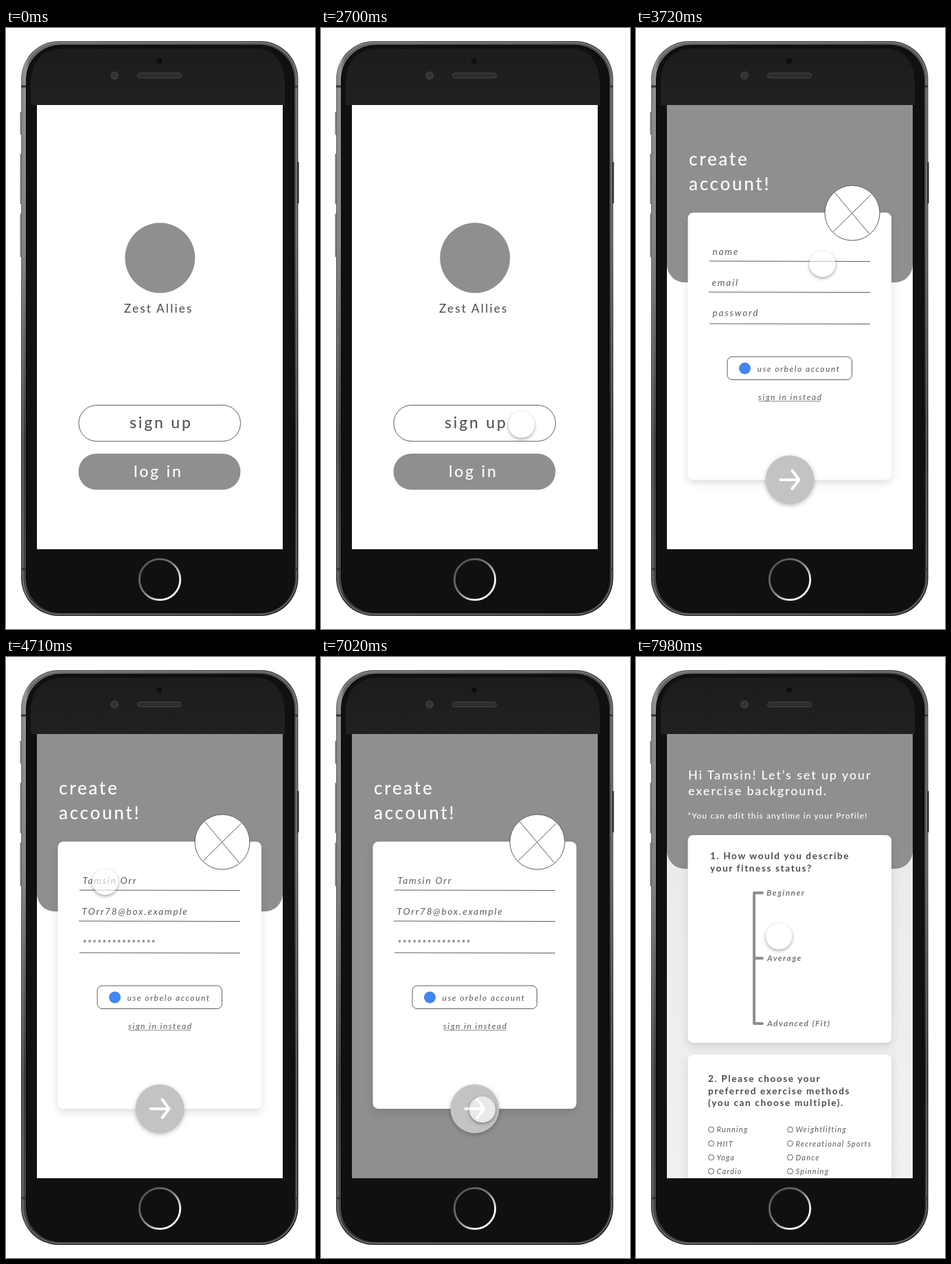
Animation, 450 px wide and 874 px high, one loop 8000 ms. Source, as an HTML page:

```html
<!DOCTYPE html>
<html lang="en">
<head>
<meta charset="utf-8">
<title>Sign-up flow</title>
<style>
html, body { margin: 0; width: 100%; height: 100%; overflow: hidden; background: #fff; }
svg { position: absolute; left: 0; top: 0; }
text { font-family: Lato, "Open Sans", sans-serif; font-weight: 500; fill: #555; white-space: pre; }
.brand { font-size: 17px; letter-spacing: 2.2px; }
.button { font-size: 23px; letter-spacing: 2.8px; }
.title { font-size: 26px; letter-spacing: 2.7px; fill: #fff; }
.field { font-size: 13.5px; letter-spacing: 1.8px; font-style: italic; fill: #6a6a6a; }
.stars { font-weight: 700; }
.small { font-size: 12px; letter-spacing: 1.5px; font-style: italic; fill: #666; }
.intro { font-size: 18px; letter-spacing: 1.85px; fill: #fff; }
.note { font-size: 12px; letter-spacing: 1.05px; fill: #fff; }
.question { font-size: 13.5px; letter-spacing: 1.65px; font-weight: 700; fill: #4a4a4a; }
.level { font-size: 12px; letter-spacing: 1.4px; font-weight: 700; font-style: italic; fill: #777; }
.option { font-size: 11px; letter-spacing: 1.15px; font-style: italic; fill: #666; }
.line { fill: none; stroke: #5c5c5c; stroke-width: 1; }
.card { fill: #fff; filter: drop-shadow(0 5px 6px rgba(0,0,0,.12)); }
#screen { position: absolute; left: 45px; top: 112px; width: 358px; height: 646px; overflow: hidden; }
#cursor {
  position: absolute; left: -64px; top: -131px; width: 38px; height: 38px; border-radius: 50%;
  background: rgba(255,255,255,.64); box-shadow: 0 2px 5px rgba(0,0,0,.36);
}
</style>
</head>
<body>
<svg width="450" height="874" viewBox="0 0 450 874">
  <defs>
    <linearGradient id="rim"><stop stop-color="#777"/><stop offset=".015" stop-color="#999"/><stop offset=".03" stop-color="#666"/><stop offset=".97" stop-color="#4a4a4a"/><stop offset="1" stop-color="#555"/></linearGradient>
    <linearGradient id="shade" x2="0" y2="1"><stop stop-opacity="0"/><stop offset=".35" stop-opacity=".1"/><stop offset=".7" stop-opacity=".6"/><stop offset="1" stop-opacity=".5"/></linearGradient>
    <linearGradient id="top" x2="0" y2="1"><stop stop-color="#1c1c1c"/><stop offset="1" stop-color="#212121"/></linearGradient>
    <linearGradient id="ring" x2="1" y2="1"><stop stop-color="#484848"/><stop offset=".45" stop-color="#777"/><stop offset=".78" stop-color="#fff"/></linearGradient>
    <linearGradient id="paper" x2="0" y2="1"><stop offset=".3" stop-color="#ebebeb"/><stop offset="1" stop-color="#f0f0f0"/></linearGradient>
    <clipPath id="glass"><rect x="45" y="112" width="358" height="646"/></clipPath>
  </defs>

  <g id="phone">
    <path d="M21.500 122v33M21.500 183v73M21.500 270v63" stroke="#777" stroke-width="2"/>
    <rect x="22" y="19" width="403.500" height="836" rx="55" fill="url(#rim)"/>
    <rect x="22" y="19" width="403.500" height="836" rx="55" fill="url(#shade)"/>
    <rect x="24.500" y="21.500" width="398.500" height="831" rx="53" fill="none" stroke="#999" stroke-opacity=".65" stroke-width="1.500"/>
    <path d="M425.500 195v60" stroke="#222" stroke-width="2"/>
    <path d="M22 85h7M419 85h6M22 787h7M419 787h6" stroke="#333" stroke-width="3"/>
    <rect x="29.500" y="25" width="390" height="825" rx="50" fill="#101010" stroke="#050505"/>
    <path d="M36 112V78Q38 32 82 30H368Q404 34 406 80V112Z" fill="url(#top)"/>
    <circle cx="223" cy="48" r="4" fill="#0d0d0d"/>
    <circle cx="158" cy="69" r="5" fill="#333" stroke="#4c4c4c" stroke-width="2" stroke-dasharray="1 1"/>
    <rect x="191.500" y="65.500" width="64" height="7" rx="3.500" fill="#2c2c2c" stroke="#454545"/>
    <circle cx="224" cy="802" r="29.700" fill="#101010" stroke="url(#ring)" stroke-width="2.800"/>
  </g>

  <g clip-path="url(#glass)">
    <rect x="45" y="112" width="358" height="646" fill="#fff"/>
    <circle cx="224.300" cy="334.300" r="51" fill="#8f8f8f"/>
    <text class="brand" x="172" y="414">Zest Allies</text>
    <rect class="line" x="106" y="548.500" width="235.500" height="52.500" rx="26"/>
    <text class="button" x="180" y="582">sign up</text>
    <rect x="105.500" y="619" width="236" height="52.500" rx="26" fill="#8f8f8f"/>
    <text class="button" x="186" y="653" style="fill:#fff">log in</text>

    <g id="page">
      <rect x="45" y="112" width="358" height="646" fill="#fff"/>
      <rect id="tint" x="45" y="112" width="358" height="646" fill="url(#paper)"/>
      <rect id="header" x="45" y="60" width="358" height="310" rx="26" fill="#8f8f8f"/>

      <g id="survey">
        <text class="intro" x="76" y="178">Hi Tamsin! Let’s set up your</text>
        <text class="intro" x="76" y="201">exercise background.</text>
        <text class="note" x="75" y="235">*You can edit this anytime in your Profile!</text>
        <rect class="card" x="75.500" y="259" width="296.500" height="302" rx="8"/>
        <text class="question" x="108" y="294">1. How would you describe</text>
        <text class="question" x="108" y="312">your fitness status?</text>
        <path d="M184 343H172V533H184M172 438H184" fill="none" stroke="#8f8f8f" stroke-width="4" stroke-linecap="round" stroke-linejoin="round"/>
        <text class="level" x="190" y="347">Beginner</text>
        <text class="level" x="191" y="442">Average</text>
        <text class="level" x="191" y="537">Advanced (Fit)</text>
        <rect class="card" x="75.500" y="578" width="296.500" height="240" rx="8"/>
        <text class="question" x="105" y="618">2. Please choose your</text>
        <text class="question" x="105" y="636">preferred exercise methods</text>
        <text class="question" x="105" y="653">(you can choose multiple).</text>
        <g id="options"></g>
      </g>

      <g id="form">
        <text class="title" x="77" y="200">create</text>
        <text class="title" x="77" y="236">account!</text>
        <rect class="card" x="75.500" y="268.500" width="296.500" height="388.500" rx="8"/>
        <path class="line" d="M107 339L341 339.500M106 384L341 384.500M107 430L341 430.500"/>
        <circle class="line" cx="315" cy="269" r="40" style="fill:#fff"/>
        <path class="line" d="M289.500 239.500L339.500 299M342.500 242L287 296.500"/>
        <g id="blank">
          <text class="field" x="111.500" y="330">name</text>
          <text class="field" x="110.500" y="375">email</text>
          <text class="field" x="111.500" y="419">password</text>
        </g>
        <g id="filled">
          <text class="field" x="111.500" y="330">Tamsin Orr</text>
          <text class="field" x="110.500" y="375">TOrr78@box.example</text>
          <text class="field stars" x="111.500" y="421">***************</text>
        </g>
        <rect class="line" x="133" y="478" width="181.500" height="33.500" rx="7"/>
        <circle cx="158.500" cy="495" r="8.500" fill="#4285f4"/>
        <text class="small" x="176.500" y="500">use orbelo account</text>
        <text class="small" x="178" y="541">sign in instead</text>
        <path d="M178.500 542.800H269" stroke="#888"/>
        <circle cx="224" cy="657" r="35.500" fill="#c3c3c3" style="filter:drop-shadow(0 2px 3px rgba(0,0,0,.25))"/>
        <path d="M210.500 657H237M227.500 643.500L237.500 657L227.500 670" fill="none" stroke="#fff" stroke-width="4" stroke-linecap="round" stroke-linejoin="round"/>
      </g>
    </g>
  </g>
</svg>
<div id="screen"><div id="cursor"></div></div>

<script>
const LOOP = 8000;
const $ = id => document.getElementById(id);

// Each move: start ms, end ms, then start, control and end points of a curve.
const moves = [
  [1200, 2130, 426, 597, 360, 583, 292, 577],
  [3100, 4110, 292, 577, 394, 301, 144.5, 327],
  [4750, 6200, 144.5, 327, 311, 546, 235, 658],
  [7250, 8000, 235, 658, 358, 482, 207.5, 406]
];

const columns = [
  [109.5, ["Running", "HIIT", "Yoga", "Cardio"]],
  [224.5, ["Weightlifting", "Recreational Sports", "Dance", "Spinning"]]
];
$("options").innerHTML = columns.map(([x, names]) => names.map((name, i) => {
  const y = 687.3 + i * 20.2;
  return `<circle class="line" cx="${x}" cy="${y}" r="4"/>
    <text class="option" x="${x + 8}" y="${y + 4}">${name}</text>`;
}).join("")).join("");

const progress = (t, a, b) => Math.min(1, Math.max(0, (t - a) / (b - a)));
const smooth = p => p * p * (3 - 2 * p);
const easeOut = p => 1 - (1 - p) ** 3;
const bezier = (u, a, b, c) => (1 - u) ** 2 * a + 2 * u * (1 - u) * b + u * u * c;
const fade = (id, value) => { $(id).style.opacity = value; };

function cursorAt(t) {
  const move = moves.filter(m => m[0] <= t).pop() || moves[0];
  const [from, to, x0, y0, cx, cy, x1, y1] = move;
  const u = smooth(progress(t, from, to));
  return [bezier(u, x0, cx, x1), bezier(u, y0, cy, y1)];
}

function draw(t) {
  const [x, y] = cursorAt(t);
  $("cursor").style.transform = `translate(${x}px, ${y}px)`;

  const typed = smooth(progress(t, 4380, 4690));
  const grow = easeOut(progress(t, 6550, 6950));
  const next = progress(t, 7040, 7440);
  const bottom = 370 + 418 * grow - 480 * easeOut(next);

  fade("page", smooth(progress(t, 2750, 3030)));
  fade("blank", 1 - typed);
  fade("filled", typed);
  fade("form", 1 - smooth(next));
  fade("survey", smooth(next));
  fade("tint", smooth(next));
  $("header").setAttribute("height", bottom - 60);
}

let start;
function tick(now) {
  start ??= now;
  draw((now - start) % LOOP);
  requestAnimationFrame(tick);
}
draw(0);
requestAnimationFrame(tick);
</script>
</body>
</html>
```
